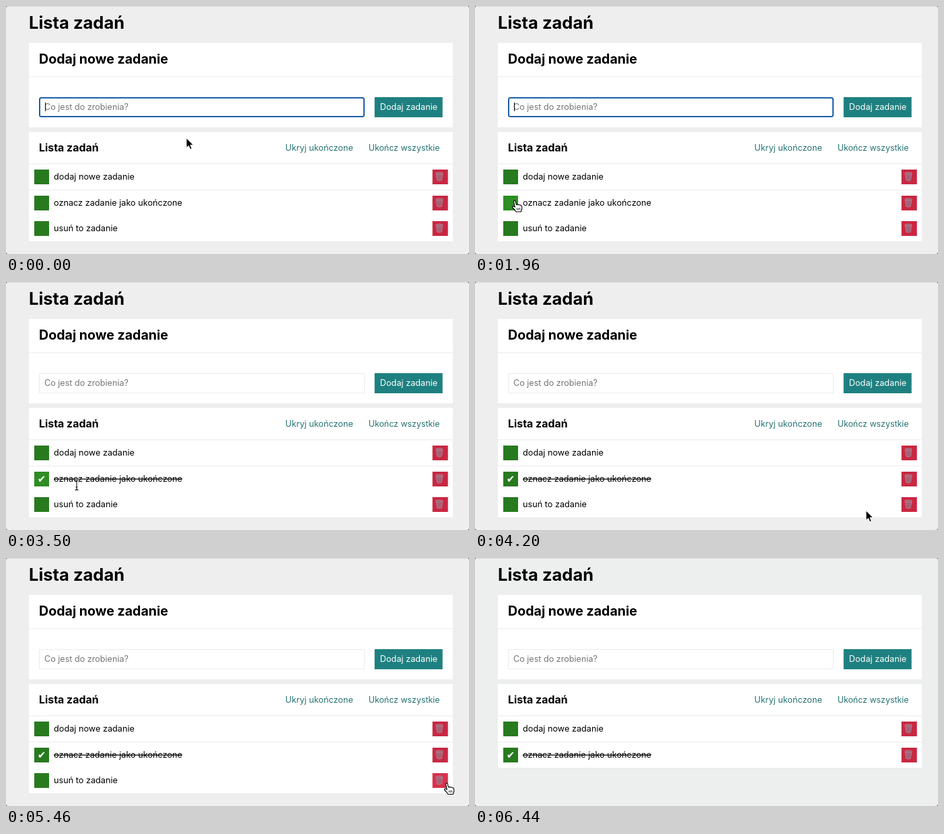
An HTML page for the animation above (6.72 s loop, 688 by 370 pixels).

```html
<!DOCTYPE html>
<html lang="pl">
<head>
<meta charset="utf-8">
<title>Lista zadań</title>
<style>
  html, body { margin: 0; width: 100%; height: 100%; overflow: hidden; background: #444; }
  svg { display: block; font: 12.7px Inter, "Open Sans", sans-serif; }
  .bold { font-weight: 700; }
  .link { fill: #267272; }
  .line { stroke: #ebebeb; }
  .done { text-decoration: line-through; }
  .check { font: 15px "DejaVu Sans", sans-serif; fill: #fff; }
</style>
</head>
<body>
<svg width="688" height="370" viewBox="0 0 688 370">
  <defs>
    <g id="bin" fill="#ab6076" stroke="#b87f8f" stroke-width=".8">
      <path d="M639 250L640.6 260Q644 262.2 647.4 260L649 250Z"/>
      <path d="M642 252l1 8M646 252l-1 8M640.5 254.5h7M641 257.5h6" fill="none" stroke="#9c6478" stroke-width=".6"/>
      <ellipse cx="644" cy="249.8" rx="5.4" ry="1.7"/>
    </g>
  </defs>
  <rect id="page" width="688" height="370" rx="3" fill="#eee"/>
  <path d="M3 .5H685" stroke="#d9d9d9"/>
  <text class="bold" x="34" y="34" font-size="25.5">Lista zadań</text>

  <path d="M34 55H664V181H34Z" fill="#fff"/>
  <path class="line" d="M34 105.5H664"/>
  <text class="bold" x="49" y="86" font-size="19.6">Dodaj nowe zadanie</text>
  <rect id="field" fill="#fff"/>
  <text x="57" y="155" font-size="12.6" fill="#757575">Co jest do zrobienia?</text>
  <path id="caret" d="M58.5 144V157" stroke="#000"/>
  <path d="M547.7 136H648.7V166H547.7Z" fill="#1e8080"/>
  <text x="598.5" y="155" text-anchor="middle" fill="#fff">Dodaj zadanie</text>

  <path d="M34 188H664V312H34Z" fill="#fff"/>
  <text class="bold" x="49" y="217" font-size="15.9">Lista zadań</text>
  <text class="link" x="415" y="216">Ukryj ukończone</text>
  <text class="link" x="644.5" y="216" font-size="12.4" text-anchor="end">Ukończ wszystkie</text>
  <path class="line" d="M34 235.5H664"/>
  <g id="rows"></g>
  <g id="cursor" stroke-linejoin="round"></g>
</svg>
<script>
const LOOP = 6720, STEP = 70, BLUR = 2310, CHECK = 2380, REMOVE = 5740;
const $ = id => document.getElementById(id);

const tasks = ["dodaj nowe zadanie", "oznacz zadanie jako ukończone", "usuń to zadanie"];
$("rows").innerHTML = tasks.map((task, i) => `
  <g id="row${i}" transform="translate(0 ${Math.round(i * 38.5)})">
    <path d="M34 236H664V274H34Z" fill="#fff"/>
    ${i < 2 ? '<path class="line" d="M34 274.5H664"/>' : ""}
    <rect id="toggle${i}" x="42" y="244" width="22" height="22" fill="hsl(114 60% 30%)"/>
    <text class="check" id="check${i}" x="53" y="260" text-anchor="middle" visibility="hidden">✔</text>
    <text id="task${i}" x="71" y="259">${task}</text>
    <rect id="remove${i}" x="633.7" y="244" width="23" height="22" fill="hsl(350 67% 47%)"/>
    <use href="#bin"/>
  </g>`).join("");

// Each shape has its hot spot at 0,0
const cursors = {
  arrow: '<path d="M0 0V14.5L3.4 11.5L5.7 16.8L8.2 15.7L5.9 10.6H10.5Z" stroke="#fff"/>',
  hand: `<path d="M-1.5 .5Q-.3-1.6 1.3 .5L2.4 5.5Q4 4.2 5 5.7Q6.7 4.5 7.6 6.2Q9.8 5.5 10.5 8L10.8 11Q10.3 13 9.3 16H2
    Q0 12.8-3 10Q-4.3 8-2.5 7.5L.3 9Z" fill="#fff" stroke="#000" stroke-width="1.1"/>
    <path d="M3.4 10.5L3.8 13.5M5.5 10.3L5.8 13.4M7.6 10L7.8 13.2" stroke="#000" stroke-width=".8"/>`,
  beam: `<path d="M-2.5-7Q0-7 0-5Q0-7 2.5-7M0-5V6M-2.5 7.5Q0 7.5 0 5.5Q0 7.5 2.5 7.5M-1.5 3H1.5"
    fill="none" stroke="#111" stroke-width="1.1"/>`
};

// time, x, y
const path = [
  [0, 268, 197], [770, 268, 197], [980, 228, 222], [1190, 160, 285], [1330, 138, 306],
  [1540, 110, 303], [1820, 63, 294], [1960, 59, 291], [3430, 59, 291], [3500, 105, 303],
  [3640, 225, 342], [3780, 300, 352], [3920, 300, 352], [4200, 581, 341], [4410, 618, 308],
  [4620, 626, 289], [4900, 632, 312], [5040, 645, 330], [5250, 655, 336.5], [6160, 655, 336.5],
  [6440, 662, 380], [LOOP, 662, 380]
];

const ramp = (t, from, length) => Math.min(1, Math.max(0, (t - from) / length));
const show = (id, on) => $(id).setAttribute("visibility", on ? "visible" : "hidden");

function position(t) {
  const i = path.findIndex(p => p[0] > t);
  const [t0, x0, y0] = path[i - 1], [t1, x1, y1] = path[i];
  const k = (t - t0) / (t1 - t0);
  return [x0 + (x1 - x0) * k, y0 + (y1 - y0) * k];
}

function cursorAt(x, y, removed) {
  const inside = (l, t, r, b) => x >= l && x <= r && y >= t && y <= b;
  if (inside(42, 283, 64, 305) || !removed && inside(634, 321, 657, 343)) return "hand";
  return inside(71, 286, 261, 304) ? "beam" : "arrow";
}

function draw(now) {
  const t = Math.floor(now % LOOP / STEP) * STEP;
  const focused = t < BLUR, done = t >= CHECK, removed = t >= REMOVE;

  const inset = focused ? 1 : .5;
  const box = { x: 49 + inset, y: 136 + inset, width: 484 - 2 * inset, height: 30 - 2 * inset,
    rx: focused ? 2.5 : 0, stroke: focused ? "#1d5fa9" : "#ebebeb", "stroke-width": 2 * inset };
  for (const key in box) $("field").setAttribute(key, box[key]);
  show("caret", focused && (t < 210 || t >= 700 && t < 1190 || t >= 1750));

  const press = ramp(t, BLUR - STEP, 140) - ramp(t, 2430, 300);
  const hover = ramp(t, 1680, 280) - ramp(t, 3500, 280) + .6 * press;
  $("toggle1").setAttribute("fill", `hsl(114 60% ${30 + 4.5 * hover}%)`);
  $("remove2").setAttribute("fill", `hsl(350 69% ${47 + 5 * ramp(t, 4950, 300)}%)`);
  show("check1", done);
  $("task1").classList.toggle("done", done);
  show("row2", !removed);
  $("page").setAttribute("fill", t >= 6230 ? "#ecefee" : "#eee");

  const [x, y] = position(t);
  $("cursor").innerHTML = cursors[cursorAt(x, y, removed)];
  $("cursor").setAttribute("transform", `translate(${x} ${y})`);
}

const start = performance.now();
function tick() {
  draw(performance.now() - start);
  requestAnimationFrame(tick);
}
tick();
</script>
</body>
</html>
```
